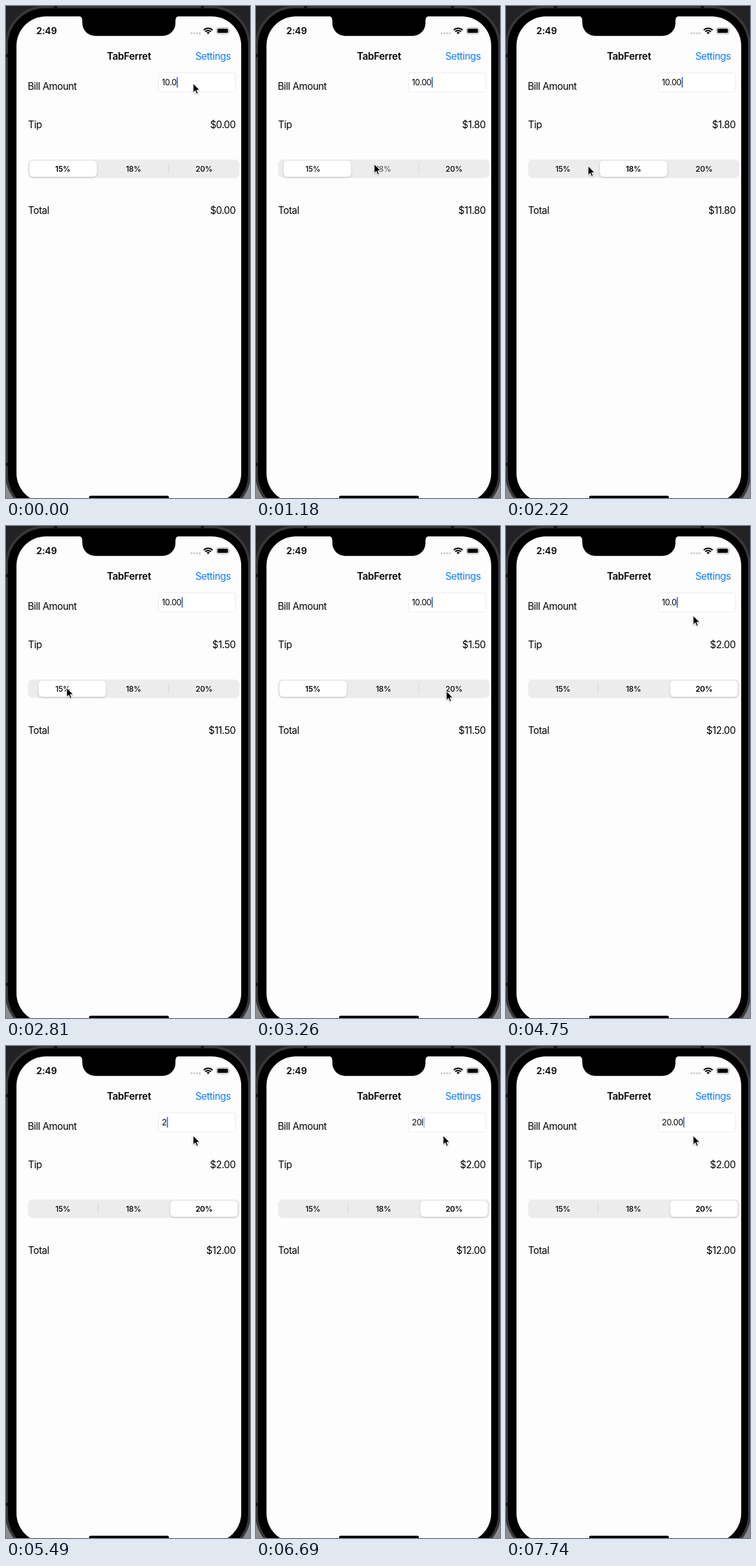
An HTML page that plays this animation: 382x769 px, repeating every 8 s.

```html
<!DOCTYPE html>
<html lang="en">
<head>
<meta charset="utf-8">
<title>Tip calculator</title>
<style>
  html, body { margin: 0; width: 100%; height: 100%; overflow: hidden; background: #222224; }
  svg { display: block; width: 100%; height: 100%; }
  text { font: 400 15.3px Inter, sans-serif; letter-spacing: -.03em; }
  .title { font-weight: 600; letter-spacing: -.015em; text-anchor: middle; }
  .time { font-size: 14.5px; font-weight: 600; letter-spacing: -.01em; }
  .link { fill: #0a7aff; }
  .amount { text-anchor: end; }
  .field { font-size: 12.8px; }
  .segment { font-size: 12px; font-weight: 500; letter-spacing: -.02em; text-anchor: middle; }
  #thumb { filter: drop-shadow(0 1px 1.5px #0003); }
  #pointer { filter: drop-shadow(0 1px 1px #0004); }
</style>
</head>
<body>
<svg viewBox="0 0 382 769">
  <!-- Phone -->
  <path d="M0 700H382V769H0Z" fill="#8c8c8e"/>
  <rect x="1" y="1.5" width="380" height="790" rx="60" stroke="#38383a" stroke-width="4"/>
  <path d="M75 0h5v4h-5zM305 0h5v4h-5zM0 75h3v5h-3zM0 714h3v5h-3z" fill="#111"/>
  <rect x="16.4" y="16.2" width="351.8" height="760" rx="46" fill="#fdfdfd"/>
  <path d="M113 15Q119.5 16 119.5 23V27A20 20 0 0 0 139.5 46.7H245A20 20 0 0 0 265.3 27V23Q265.3 16 272 15Z"/>
  <rect x="130" y="765.5" width="125" height="5" rx="2.5"/>

  <!-- Status bar -->
  <text class="time" x="47.5" y="44">2:49</text>
  <path d="M290.5 42.5h.01m4.3 0h.01m4.3 0h.01m4.3 0h.01" stroke="#c9c9c9" stroke-width="3.2" stroke-linecap="round"/>
  <g transform="translate(316.5 44)" fill="none" stroke="#000" stroke-width="2.1">
    <path d="M-6.9 -6.3A9.6 9.6 0 0 1 6.9 -6.3M-4.4 -3.8A6.1 6.1 0 0 1 4.4 -3.8"/>
    <path d="M0 0L-2.4 -2.3A3.4 3.4 0 0 1 2.4 -2.3Z" fill="#000" stroke="none"/>
  </g>
  <rect x="329.5" y="34" width="19.5" height="9.5" rx="2.8" fill="none" stroke="#a2a2a2"/>
  <rect x="331" y="35.5" width="16.5" height="6.5" rx="1.5"/>
  <path d="M350.3 37.2q1.3 1.5 0 3z" fill="#a2a2a2"/>

  <!-- Page -->
  <text class="title" x="192.5" y="84">TabFerret</text>
  <text class="link" x="296.5" y="84">Settings</text>
  <text x="34" y="130.7">Bill Amount</text>
  <text x="34.5" y="191">Tip</text>
  <text x="34.5" y="324.5">Total</text>
  <text class="amount" id="tip" x="359.5" y="191"></text>
  <text class="amount" id="total" x="359.5" y="324.5"></text>
  <rect x="238.5" y="104.5" width="121" height="30" rx="4" fill="#fff" stroke="#ebebeb"/>
  <text class="field" id="bill" x="244" y="123.7"></text>
  <rect id="caret" y="111" width="1.7" height="16.5" rx=".6" fill="#3565d6"/>

  <!-- Segmented control -->
  <rect x="34.5" y="240" width="331" height="28.7" rx="7.5" fill="#ececec"/>
  <path class="divider" d="M144.2 246.5V262" stroke="#d6d6d6"/>
  <path class="divider" d="M254.9 246.5V262" stroke="#d6d6d6"/>
  <rect id="thumb" x="36.6" y="241.7" width="105.6" height="25.4" rx="6" fill="#fff"/>
  <text class="segment" x="89" y="258.8">15%</text>
  <text class="segment" x="199.5" y="258.8">18%</text>
  <text class="segment" x="310" y="258.8">20%</text>

  <path id="pointer" d="M0 0V14.3L3.3 11.3L5.5 16.4L7.8 15.4L5.7 10.4H10.2Z" stroke="#fff" stroke-width="1" stroke-linejoin="round"/>
</svg>
<script>
const LOOP = 8000, STEP = 149, SLIDE = 400, BLINK = 1040, SPACING = 110.3;
const $ = id => document.getElementById(id);
const segments = document.querySelectorAll('.segment');
const dividers = document.querySelectorAll('.divider');

// [time, field text], including a mistyped letter that is deleted again
const typing = [
  [0, '10.0'], [240, '10.00'],
  [4700, '10.0'], [4870, '10.'], [5020, '10'], [5160, '1'], [5300, ''],
  [5460, '2'], [5760, '20'], [6060, '20l'], [6950, '20'], [7250, '20.'],
  [7560, '20.0'], [7700, '20.00']
];
// [time, segment, tip on a bill of 10]
const taps = [[-SLIDE, 0, 0], [1117, 1, 1.8], [2506, 0, 1.5], [3510, 2, 2]];
// [time, x, y]
const moves = [
  [450, 293, 121], [1040, 185, 247], [1500, 185, 247], [2200, 129, 250],
  [2500, 95, 253], [2820, 95, 253], [3250, 298, 258], [3860, 298, 258], [4290, 293, 140]
];

const clamp = v => Math.min(1, Math.max(0, v));
const ease = v => v * v * (3 - 2 * v);
const mix = (a, b, u) => a + (b - a) * u;
const money = v => '$' + v.toFixed(2);
const lastIndex = (list, t) => Math.max(0, list.findLastIndex(entry => entry[0] <= t));

function pointerAt(t) {
  const i = lastIndex(moves, t), a = moves[i], b = moves[i + 1] || a;
  const u = ease(clamp((t - a[0]) / (b[0] - a[0] || 1)));
  return [mix(a[1], b[1], u), mix(a[2], b[2], u)];
}

function caretOpacity(sinceKey) {
  const p = sinceKey % BLINK;
  return p < 800 ? 1 - clamp((p - 510) / 220) : clamp((p - 800) / 120);
}

function drawField(t) {
  const [keyTime, value] = typing[lastIndex(typing, t)];
  $('bill').textContent = value;
  const width = value ? $('bill').getComputedTextLength() : 0;
  $('caret').setAttribute('x', 244.4 + width);
  $('caret').setAttribute('opacity', caretOpacity(t - keyTime));
}

function drawControl(t) {
  const i = lastIndex(taps, t);
  const [time, segment, tip] = taps[i];
  const from = taps[Math.max(0, i - 1)][1];
  const position = mix(from, segment, ease(clamp((t - time) / SLIDE)));
  $('tip').textContent = money(tip);
  $('total').textContent = money(tip && 10 + tip);
  $('thumb').setAttribute('transform', `translate(${position * SPACING})`);

  segments.forEach((label, n) => {
    const pressed = taps.some(tap => tap[1] === n && Math.abs(t - tap[0]) < 120);
    label.style.opacity = pressed ? .6 : 1;
    label.style.fontWeight = Math.abs(position - n) < .04 ? 600 : 500;
  });
  dividers.forEach((line, n) =>
    line.setAttribute('opacity', clamp(Math.abs(position - n - .5) * 2 - 1)));
}

function draw(now) {
  const t = Math.max(0, Math.floor(now % LOOP / STEP + .16) * STEP - 15);
  drawField(t);
  drawControl(t);
  $('pointer').setAttribute('transform', `translate(${pointerAt(t)})`);
}

const start = performance.now();
function tick() {
  draw(performance.now() - start);
  requestAnimationFrame(tick);
}
tick();
</script>
</body>
</html>
```
